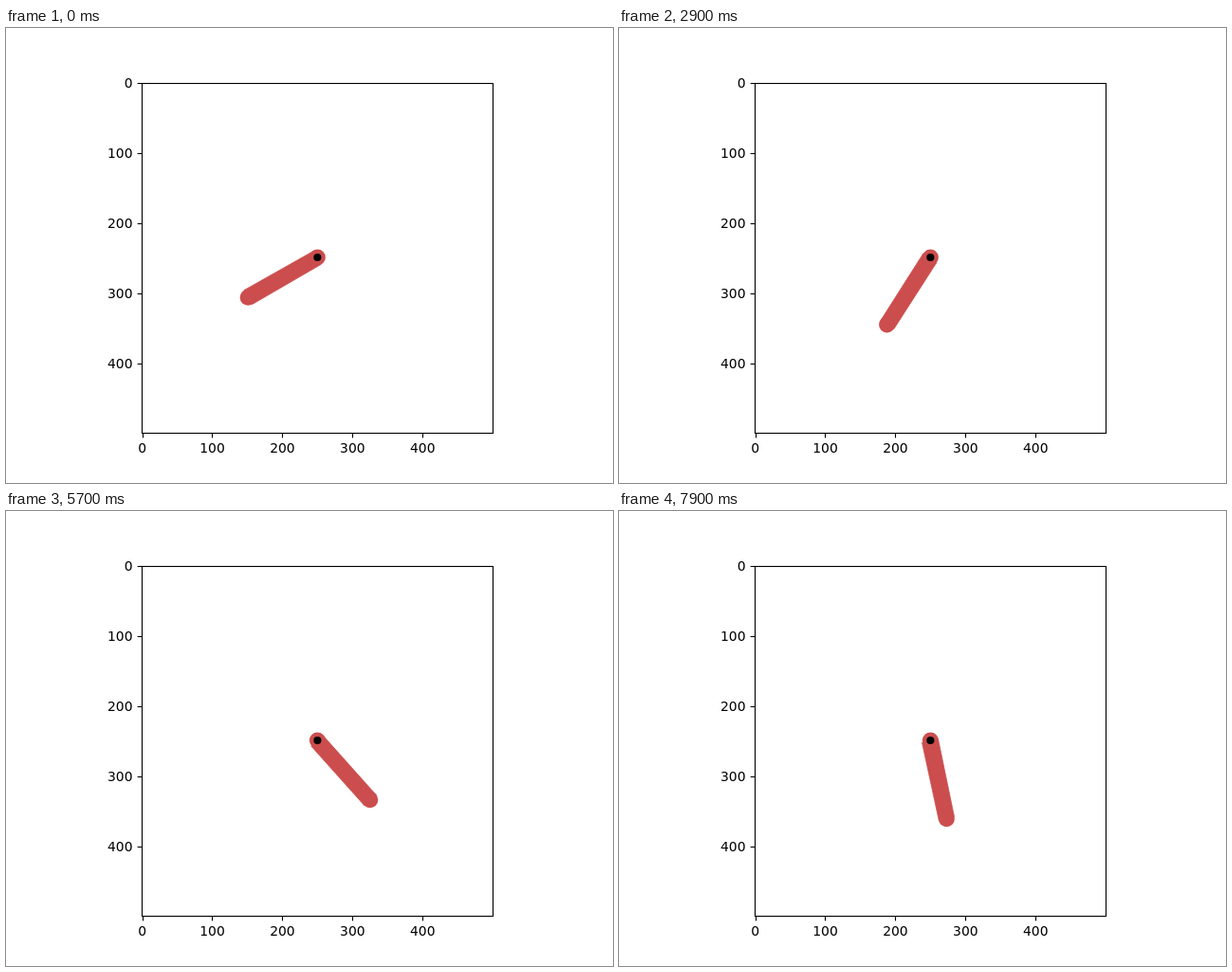
An HTML page with a canvas for the animation above (8 s loop, 640 by 480 pixels).

```html
<!DOCTYPE html>
<html>
<head>
<meta charset="utf-8">
<style>
html, body { margin: 0; width: 640px; height: 480px; overflow: hidden; background: #fff; }
canvas { display: block; }
</style>
</head>
<body>
<canvas id="stage" width="640" height="480"></canvas>
<script>
const ctx = document.getElementById('stage').getContext('2d');
const STEP = 100, LOOP = 8000;
const LEFT = 143.2, TOP = 57.6, SCALE = 369.6 / 500;
const CENTER = 250, LENGTH = 500 / 4.4, HALF_WIDTH = LENGTH / 10;

// Steps at which the rod hangs straight down, and the peak angle of each swing between them
const crossings = [-9, 8.11, 25.95, 42.9, 60.88, 77.95, 96];
const peaks = [-60.3, 64.5, -60, 65.5, -61.8, 65];

// Large pendulum swing: a sine with a small third harmonic
function angleAt(step) {
  const i = crossings.findIndex(c => c > step) - 1;
  const phase = Math.PI * (step - crossings[i]) / (crossings[i + 1] - crossings[i]);
  const e = 0.0059;
  const swing = (1 + e) * Math.sin(phase) + e * Math.sin(3 * phase);
  return peaks[i] * swing * Math.PI / 180;
}

function line(x1, y1, x2, y2) {
  ctx.beginPath();
  ctx.moveTo(x1, y1);
  ctx.lineTo(x2, y2);
  ctx.stroke();
}

function disc(x, y, r) {
  ctx.beginPath();
  ctx.arc(x, y, r, 0, 2 * Math.PI);
  ctx.fill();
}

function drawAxes() {
  ctx.strokeStyle = ctx.fillStyle = '#000';
  ctx.lineWidth = 1.11;
  ctx.strokeRect(143.5, 58.5, 370, 369);
  ctx.font = '13.889px "DejaVu Sans", sans-serif';
  for (let v = 0; v < 500; v += 100) {
    const offset = (v + 0.5) * SCALE;
    const x = Math.round(LEFT + offset) + 0.5;
    const y = Math.round(TOP + offset) + 0.5;
    line(x, 427.5, x, 432.4);
    line(138.6, y, 143.5, y);
    ctx.textAlign = 'center';
    ctx.fillText(v, LEFT + offset, 448);
    ctx.textAlign = 'right';
    ctx.fillText(v, 133.5, y + 4.5);
  }
}

function drawPendulum(angle) {
  const s = Math.sin(angle), c = Math.cos(angle);
  // Point at a distance along and across the rod, on the whole-pixel plot grid
  const point = (along, across) => [
    Math.floor(CENTER + along * s + across * c),
    Math.floor(CENTER - along * c + across * s)
  ];
  ctx.save();
  ctx.translate(LEFT + SCALE / 2, TOP + 499.5 * SCALE);
  ctx.scale(SCALE, -SCALE);
  ctx.fillStyle = ctx.strokeStyle = '#cc4d4d';
  ctx.lineWidth = 1;
  ctx.beginPath();
  for (const [along, across] of [[0, -1], [0, 1], [1, 1], [1, -1]])
    ctx.lineTo(...point(along * LENGTH, across * HALF_WIDTH));
  ctx.closePath();
  ctx.fill();
  ctx.stroke();
  disc(CENTER, CENTER, 11.5);
  disc(...point(LENGTH, 0), 11.5);
  ctx.fillStyle = '#000';
  disc(CENTER, CENTER, 5.5);
  ctx.restore();
}

function draw() {
  const step = Math.floor(performance.now() % LOOP / STEP);
  ctx.fillStyle = '#fff';
  ctx.fillRect(0, 0, 640, 480);
  drawPendulum(angleAt(step));
  drawAxes();
  requestAnimationFrame(draw);
}
draw();
</script>
</body>
</html>
```
